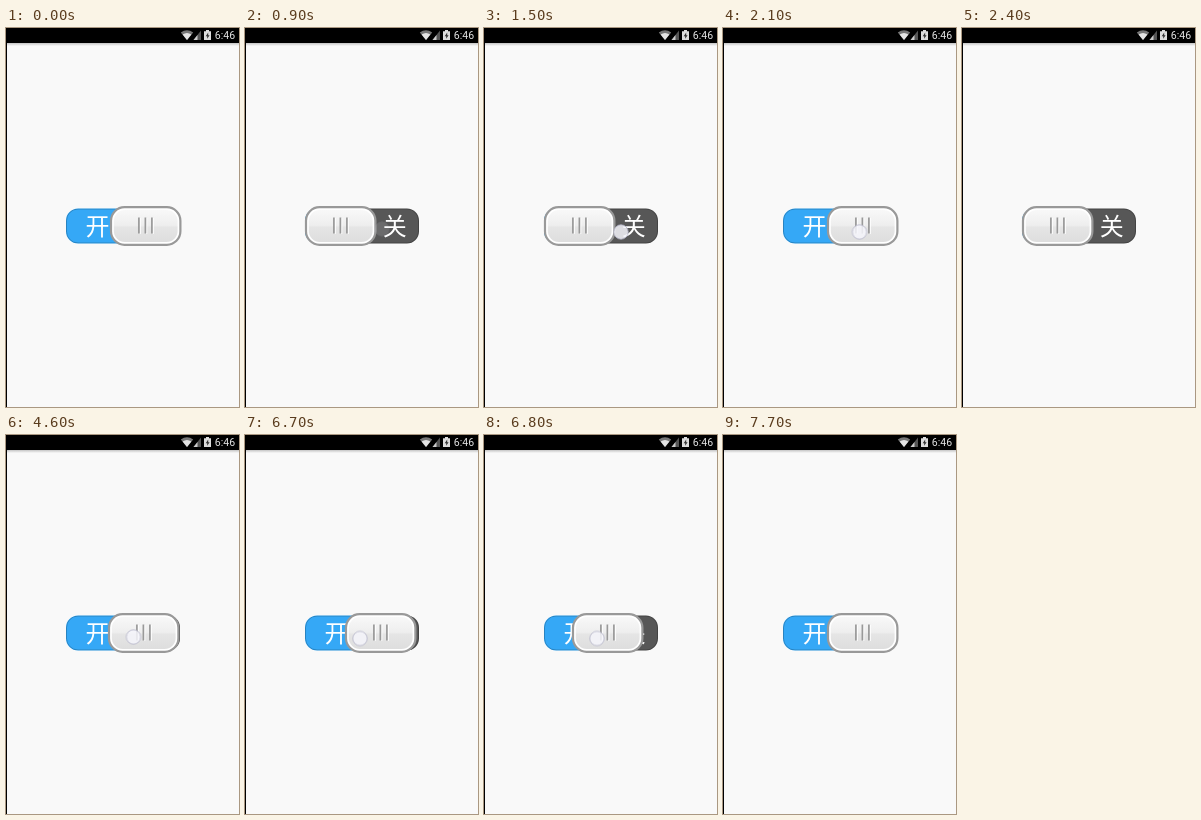
An HTML page that plays this animation: 233x379 px, repeating every 8000 ms.

```html
<!DOCTYPE html>
<html lang="zh">
<head>
<meta charset="utf-8">
<title>Toggle switch</title>
<style>
  html, body { margin: 0; width: 100%; height: 100%; overflow: hidden; background: #f9f9f9; }
  svg { display: block; width: 233px; height: 379px; }
  .label { font: 24px "Noto Sans CJK SC", "Noto Sans CJK", sans-serif; fill: #fff; text-anchor: middle; }
  .clock { font: 10.5px Roboto, sans-serif; fill: #e4e4e4; }
</style>
</head>
<body>
<svg viewBox="0 0 233 379">
  <defs>
    <linearGradient id="face" x2="0" y2="1">
      <stop offset="0" stop-color="#f8f8f8"/>
      <stop offset=".48" stop-color="#eeeeee"/>
      <stop offset=".54" stop-color="#e5e5e5"/>
      <stop offset="1" stop-color="#dedede"/>
    </linearGradient>
    <linearGradient id="shade" x2="0" y2="1">
      <stop offset="0" stop-color="#c4c4c4"/>
      <stop offset="1" stop-color="#f9f9f9"/>
    </linearGradient>
    <clipPath id="pill"><rect x="60" y="180.5" width="114" height="35" rx="12"/></clipPath>
  </defs>

  <rect width="233" height="379" fill="#f9f9f9"/>
  <rect y="15" width="233" height="3" fill="url(#shade)"/>
  <path d="M0 0H233V15H1V379H0Z"/>

  <g id="status">
    <path d="M174.8 4.6Q181 -.2 187.2 4.6L181 12Z" fill="#777"/>
    <path d="M176.6 6.6Q181 3.3 185.4 6.6L181 12Z" fill="#e4e4e4"/>
    <path d="M195 2.5V12H187.5Z" fill="#555"/>
    <path d="M191.5 7V12H187.5Z" fill="#ccc"/>
    <path d="M200 2H203V3.2H205V12H198V3.2H200Z" fill="#ddd"/>
    <path d="M202.2 4.6L199.7 8.2H201.2V10.8L203.6 7.2H202.2Z" fill="#333"/>
    <text class="clock" x="208.8" y="11.3">6:46</text>
  </g>

  <g clip-path="url(#pill)">
    <rect x="60" y="180" width="57" height="36" fill="#35a8f6"/>
    <rect x="117" y="180" width="57" height="36" fill="#575757"/>
    <rect x="60.5" y="181" width="113" height="34" rx="11.5" fill="none" stroke="#000" stroke-opacity=".22"/>
    <text class="label" x="91.5" y="207">开</text>
    <text class="label" x="149.8" y="206.5">关</text>
  </g>

  <g id="knob">
    <rect x="1" y="179.2" width="69.4" height="37.6" rx="13.5" fill="#fff" stroke="#999" stroke-width="2.2"/>
    <rect x="3.8" y="182" width="63.8" height="32" rx="11" fill="url(#face)"/>
    <path d="M30.2 190V206M36.7 190V206M43.2 190V206" stroke="#fff" stroke-width="1.2"/>
    <path d="M28.9 189.5V205.5M35.4 189.5V205.5M41.9 189.5V205.5" stroke="#999" stroke-width="1.7"/>
  </g>

  <circle id="touch" r="7.2" fill="#f4f4fa" fill-opacity=".85" stroke="#b4b4c8" stroke-width=".8"/>
</svg>
<script>
  const LOOP = 8000, ON = 104, OFF = 60;

  // time, knob x, touch x, touch y, touch opacity
  const steps = [
    [0, ON, 137, 203, 0],
    [700, ON, 137, 203, 1],
    [800, OFF, 137, 203, 1],
    [900, OFF, 137, 201, .15],
    [1000, OFF, 137, 203, 0],
    [1500, OFF, 137, 204, 1],
    [1600, ON, 137, 204, .7],
    [1700, ON, 137, 204, 0],
    [2100, ON, 136.5, 204, 1],
    [2300, OFF, 136.5, 204, .7],
    [2400, OFF, 136.5, 204, 0],
    [3800, ON, 129, 202, 0],
    [4400, ON, 129, 202, 1],
    [4500, 103, 128, 202, 1],
    [4600, 102, 127.5, 202, 1],
    [6700, 100, 115, 203.5, 1],
    [6800, 88, 113, 203.5, 1],
    [7500, 94, 121, 203, 1],
    [7600, 102, 127, 203, 1],
    [7700, ON, 129, 203, 0],
    [LOOP, ON, 129, 203, 0]
  ];

  function play(id, pose) {
    const frames = steps.map(s => ({ offset: s[0] / LOOP, easing: "steps(1, end)", ...pose(s) }));
    document.getElementById(id).animate(frames, { duration: LOOP, iterations: Infinity });
  }

  play("knob", ([, x]) => ({ transform: `translate(${x}px, 0px)` }));
  play("touch", ([, , x, y, opacity]) => ({ transform: `translate(${x}px, ${y}px)`, opacity }));
</script>
</body>
</html>
```
